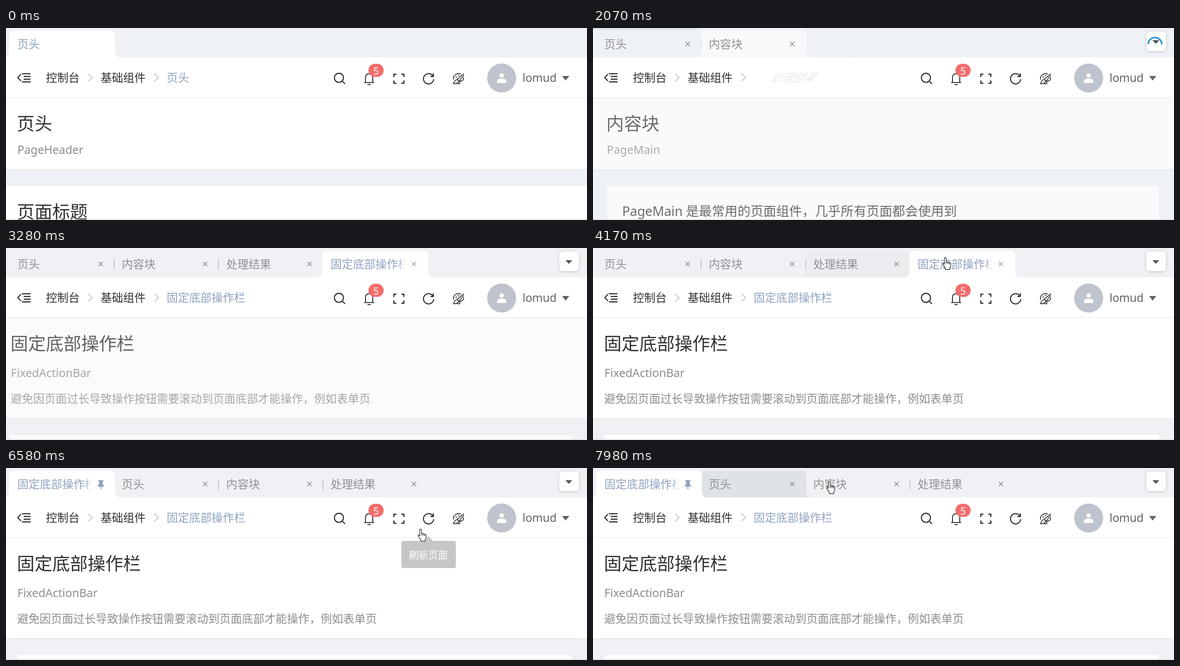
An HTML page for the animation above (8 s loop, 1280 px wide and 424 px high).

```html
<!DOCTYPE html>
<html lang="zh-CN">
<head>
<meta charset="utf-8">
<style>
html, body { margin: 0; width: 100%; height: 100%; overflow: hidden; background: #eef1f5; }
svg { display: block; width: 100vw; height: 100vh; font-family: "Noto Sans", "Noto Sans CJK SC", sans-serif; }
text { white-space: pre; }
</style>
</head>
<body>
<svg id="stage" viewBox="0 0 1280 424" preserveAspectRatio="none">
  <defs>
    <linearGradient id="fade" gradientUnits="userSpaceOnUse" x1="172" x2="191" y1="0" y2="0">
      <stop offset="0" stop-color="#fff"/><stop offset="1" stop-color="#fff" stop-opacity="0"/>
    </linearGradient>
    <mask id="clip" maskUnits="userSpaceOnUse" x="0" y="0" width="240" height="70">
      <rect width="240" height="70" fill="url(#fade)"/>
    </mask>
    <linearGradient id="glow" x2="0" y2="1">
      <stop offset="0" stop-color="#2b95d6" stop-opacity=".2"/><stop offset="1" stop-color="#2b95d6" stop-opacity="0"/>
    </linearGradient>
    <filter id="shadow" x="-20%" y="-20%" width="140%" height="140%">
      <feDropShadow dx="0" dy="1" stdDeviation="3" flood-color="#000" flood-opacity=".2"/>
    </filter>
  </defs>
  <rect id="ground" width="1280" height="424"/>
  <g id="pages"></g>
  <g id="hovers"></g>
  <g id="tabs"></g>
  <g id="seps"></g>
  <rect y="65" width="1280" height="89" fill="#fff"/>
  <rect y="153.5" width="1280" height="1.2" fill="#e6e8ea"/>
  <g id="drop">
    <rect x="1219" y="8" width="43" height="43" rx="8" fill="#fff" filter="url(#shadow)"/>
    <path d="M1232.500 27H1247.500L1240 35Z" fill="#555"/>
  </g>
  <g id="bar"></g>
  <g fill="none" stroke="#2b2c2f" stroke-width="2.3">
    <path d="M33 102L26 109.500L33 117M35 101H54M39 107H54M39 113H54M35 119H54" stroke-width="2.4"/>
    <circle cx="733.500" cy="110" r="10"/><path d="M740.500 117L747 123.500"/>
    <path d="M792 120V109.500C792 104 795 101 800 101S808 104 808 109.500V120M789 120.500H811M796.500 125H803.500" stroke-width="2"/>
    <path d="M854.500 108V102H860M871 102H876.500V108M876.500 116V122H871M860 122H854.500V116" stroke-width="2.6"/>
    <path d="M940.500 106A11.300 11.300 0 1 0 942.300 113M941.500 100V107H935"/>
    <path d="M1002 102A11 11 0 0 0 986 114M1008 109Q1009 116 1003 117Q998 117 1000 123Q996 124 993 122.500M1008.500 101L994 113.500Q988 115 986 123Q994 124 998 117.500L1008.500 104.500M994 113.500L998 117.500" stroke-width="1.8"/>
    <path d="M990.500 108.500H993M996 105H998.500" stroke-width="2.3"/>
  </g>
  <rect x="798.500" y="79" width="33.500" height="29" rx="14.500" fill="#f56c6c"/>
  <circle cx="1092" cy="110.500" r="32" fill="#bfc3cd"/>
  <circle cx="1092" cy="105" r="5" fill="#fff"/>
  <path d="M1082 121.500V118Q1082 112 1088 112H1096Q1102 112 1102 118V121.500Z" fill="#fff"/>
  <path d="M1225 106H1241L1233 116Z" fill="#606266"/>
  <path d="M181 101L190 109.500L181 118M327 101L336 109.500L327 118" fill="none" stroke="#c0c4cc" stroke-width="1.8"/>
  <g id="labels"></g>
  <g id="crumb"></g>
  <g id="tip">
    <path d="M876 161H921L931 151L941 161H986Q991 161 991 166V216Q991 221 986 221H876Q871 221 871 216V166Q871 161 876 161Z" fill="#303133"/>
  </g>
  <g id="menu">
    <rect x="814" y="28" width="301" height="379" rx="6" fill="#fff" filter="url(#shadow)"/>
    <rect x="814" y="157.300" width="301" height="1.600" fill="#e3e5e8"/>
    <path d="M847 68A7.500 7.500 0 0 1 861 68M861 74A7.500 7.500 0 0 1 847 74M846 63V68.500H851M862 79V73.500H857M847 181L860.500 194.500M860.500 181L847 194.500" fill="none" stroke="#606266" stroke-width="1.700"/>
  </g>
  <rect y="422.800" width="1280" height="1.200" fill="#d4d5d7"/>
  <g id="cursor" fill="#fff" stroke="#333" stroke-width="1.400" stroke-linejoin="round">
    <path id="hand" d="M-2 2Q-2 0 0 0T2 2V10Q4 8.500 5.500 10.500Q8 9.500 9 12Q12 11 12 14.500V19L10 23V26.500H0V23L-5 16Q-6.500 13 -4 12.500L-2 15ZM2 10V14M5.500 10.500V14.500M9 12V15"/>
    <path id="arrow" d="M0 0V21L5 16.500L8.500 24.500L12 23L8.500 15.500H15Z"/>
  </g>
</svg>
<script>
const NS = 'http://www.w3.org/2000/svg';
const LOOP = 8000, BODY = 24.78, STEP = 230, BLUE = '#8fa2c0', GRAY = '#8f9194';
const OPENED = [-1000, 1220, 2020, 2860], PINNED = 6370;
const NAMES = ['页头', '内容块', '处理结果', '固定底部操作栏'];
const TAB = 'M-6 65Q7 65 7 52V17Q7 6 18 6H229Q240 6 240 17V52Q240 65 253 65Z';
const PIN = 'M203 27H215V29H213V36L216 39V41H210V47H208V41H202V39L205 36V29H203Z';
const $ = id => document.getElementById(id);

function add(parent, tag, attrs = {}, content) {
  const el = document.createElementNS(NS, tag);
  set(el, attrs);
  if (content) el.textContent = content;
  parent.appendChild(el);
  return el;
}
function set(el, attrs) {
  for (const k in attrs) el.setAttribute(k, attrs[k]);
}
// y is the optical middle of the line
function label(parent, s, x, y, fill, size = BODY) {
  return add(parent, 'text', { x, y: y + size * .38, fill, 'font-size': size }, s);
}

const clamp = v => Math.max(0, Math.min(1, v));
function ease(v) {
  v = clamp(v);
  let lo = 0, hi = 1;
  for (let i = 0; i < 16; i++) {
    const s = (lo + hi) / 2, r = 1 - s;
    if (.75 * r * r * s + .75 * r * s * s + s * s * s < v) lo = s; else hi = s;
  }
  const r = 1 - lo;
  return .3 * r * r * lo + 3 * r * lo * lo + lo * lo * lo;
}
const ramp = (t, start, span) => ease((t - start) / span);
const pulse = (t, on, off, inSpan, outSpan) => ramp(t, on, inSpan) * (1 - ramp(t, off, outSpan));

// Pages
const PAGES = [
  { sub: 'PageHeader', enter: -1000, leave: 1240, left: 0, right: 1280 },
  { sub: 'PageMain', enter: 1410, leave: 2040 },
  { sub: 'Result', enter: 2200, leave: 2880 },
  { sub: 'FixedActionBar', enter: 3192, leave: 9000, bottom: 376, subY: 275 }
];
PAGES.forEach((p, i) => {
  Object.assign(p, { left: 25, right: 1246, bottom: 312, subY: 268, ...p });
  const g = p.g = add($('pages'), 'g');
  add(g, 'rect', { x: -20, y: 154, width: 1380, height: p.bottom - 154, fill: '#fff' });
  add(g, 'rect', { x: -20, y: p.bottom, width: 1380, height: 1.2, fill: '#e2e5e9' });
  p.main = add(g, 'rect', { x: p.left, y: p.bottom + 37, height: 100, fill: '#fff' });
  label(g, NAMES[i], 24, 210, '#303133', 39);
  label(g, p.sub, 25, p.subY, '#8a8d93', 25.1);
});
label(PAGES[0].g, '页面标题', 24, 405, '#303133', 39);
label(PAGES[1].g, 'PageMain 是最常用的页面组件，几乎所有页面都会使用到', 59, 404.5, '#303133', 28.42);
label(PAGES[3].g, '避免因页面过长导致操作按钮需要滚动到页面底部才能操作，例如表单页', 24.5, 333, '#8a8d93');

// Tabs, separators, breadcrumb
const tabs = NAMES.map(name => {
  const g = add($('tabs'), 'g');
  return {
    g,
    hover: add($('hovers'), 'path', { d: TAB, fill: '#dcdfe4' }),
    back: add(g, 'path', { d: TAB, fill: '#fff' }),
    text: label(add(g, 'g', { mask: 'url(#clip)' }), name, 25, 36, GRAY),
    close: add(g, 'path', { d: 'M204 30.500L213.500 40M213.500 30.500L204 40', 'stroke-width': 1.7 }),
    pin: add(g, 'path', { d: PIN, fill: BLUE })
  };
});
const seps = [0, 1, 2].map(k => add($('seps'), 'rect', { x: 237.3 + STEP * k, y: 25, width: 1.8, height: 23, fill: '#b9bcc1' }));
const crumbs = NAMES.map(name => label($('crumb'), name, 354, 110, BLUE));

const labels = $('labels');
label(labels, '控制台', 88, 110, '#303133');
label(labels, '基础组件', 208.5, 110, '#303133');
label(labels, 'lomud', 1138, 110, '#606266');
set(label(labels, '5', 815.2, 95, '#fff', 21.5), { 'text-anchor': 'middle' });
label($('tip'), '刷新页面', 888, 192, '#fff', 21.24);
const items = ['重新加载', '固定', '关闭标签页', '关闭其它标签页', '关闭左侧标签页', '关闭右侧标签页']
  .map((s, i) => label($('menu'), s, 879.5, 71.5 + 58.4 * i, i < 5 ? '#606266' : '#c0c4cc', 23));

// Loading bar and spinner
const glow = add($('bar'), 'rect', { height: 5, fill: 'url(#glow)' });
const spin = add($('bar'), 'path', { d: 'M1223 36A15 15 0 0 1 1253 36', fill: 'none', stroke: '#2b95d6', 'stroke-width': 3.6 });

// Pointer path: time, x, y
const PATH = [
  [3560, -20, 330], [3700, 178, 228], [3800, 360, 120], [3890, 480, 60], [4040, 690, 28],
  [4170, 776, 21], [4300, 806, 25], [4450, 814, 28], [5470, 814, 28], [5700, 840, 60],
  [6000, 890, 110], [6250, 913.5, 135], [6880, 913.5, 135], [7000, 860, 110], [7190, 690, 60],
  [7400, 420, 36], [7600, 300, 30], [7750, 310, 30], [7980, 520, 30], [8000, 530, 30]
];
function pointer(t) {
  const i = PATH.findIndex(p => p[0] > t);
  if (i < 1) return [-50, 330];
  const [a, b] = [PATH[i - 1], PATH[i]], k = (t - a[0]) / (b[0] - a[0]);
  return [a[1] + (b[1] - a[1]) * k, a[2] + (b[2] - a[2]) * k];
}

function hoverOf(i, t) {
  if (i === 0) return pulse(t, 7380, 7940, 150, 250);
  if (i === 1) return pulse(t, 7200, 7370, 150, 250) + .9 * ramp(t, 7970, 250);
  if (i === 2) return pulse(t, 3890, 4050, 150, 250);
  return 0;
}

function draw(t) {
  const current = OPENED.filter(s => t >= s).length - 1;
  const since = t - OPENED[current];
  set($('ground'), { fill: current < 3 ? '#eef1f5' : '#eff1f5' });

  for (const p of PAGES) {
    const inn = ramp(t, p.enter, 200), out = ramp(t, p.leave, 150);
    const dx = 17 * out - 55 * (1 - inn);
    set(p.g, { opacity: inn * (1 - out), transform: `translate(${dx} 0)` });
    set(p.main, { width: p.right - p.left - dx });
  }

  const moved = ramp(t, PINNED, 200), slots = [];
  tabs.forEach((tab, i) => {
    const from = OPENED[i], next = OPENED[i + 1] ?? 9e4;
    const shown = ramp(t, from + 50, 200);
    const active = shown * (1 - ramp(t, next, 200));
    const hover = hoverOf(i, t);
    const slot = i === 3 ? 3 - 3 * moved : i + moved;
    const pinned = i === 3 && t >= PINNED;
    slots[Math.round(slot)] = { shown, busy: Math.max(active, hover) };
    const at = `translate(${STEP * slot} ${30 * (1 - shown)})`;
    set(tab.g, { opacity: shown, transform: at });
    set(tab.hover, { opacity: hover, transform: at });
    set(tab.back, { opacity: active });
    set(tab.text, { fill: i === current ? BLUE : GRAY });
    set(tab.close, { stroke: i === current ? BLUE : '#85878a', opacity: current > 0 && !pinned ? 1 : 0 });
    set(tab.pin, { opacity: pinned ? 1 : 0 });
    const inn = ramp(since, 0, 300);
    set(crumbs[i], {
      opacity: i === current ? inn : 0,
      transform: `translate(${53 * (1 - inn)} 0) translate(404 110) skewX(${-50 * (1 - inn)}) translate(-404 -110)`
    });
  });
  seps.forEach((sep, k) => {
    const a = slots[k], b = slots[k + 1];
    set(sep, { opacity: a && b ? b.shown * (1 - Math.max(a.busy, b.busy)) : 0 });
  });

  set($('drop'), { opacity: current > 0 ? 1 : 0 });
  const loading = current > 0 ? 1 - clamp((since - 250) / 100) : 0;
  set($('bar'), { opacity: loading });
  set(glow, { width: since < 150 ? 100 + since * 2.6 : Math.min(1280, 490 + (since - 150) * 8) });
  set(spin, { transform: `rotate(${since * .9 - 45} 1238 36)` });

  const [x, y] = pointer(t);
  set($('menu'), { opacity: pulse(t, 4820, PINNED, 200, 130) });
  set($('tip'), { opacity: pulse(t, 6543, 7100, 200, 200) });
  const row = t > 5470 && t < 6600 && y > 43 ? Math.floor((y - 43) / 58.4) : -1;
  items.slice(0, 5).forEach((el, i) => set(el, { fill: i === row ? '#303133' : '#606266' }));

  const hand = y < 65 || x > 870 || row >= 0;
  set($('cursor'), { transform: `translate(${x} ${y})` });
  set($('hand'), { opacity: hand ? 1 : 0 });
  set($('arrow'), { opacity: hand ? 0 : 1 });
}

const begin = performance.now();
function tick() {
  draw((performance.now() - begin) % LOOP);
  requestAnimationFrame(tick);
}
tick();
</script>
</body>
</html>
```
